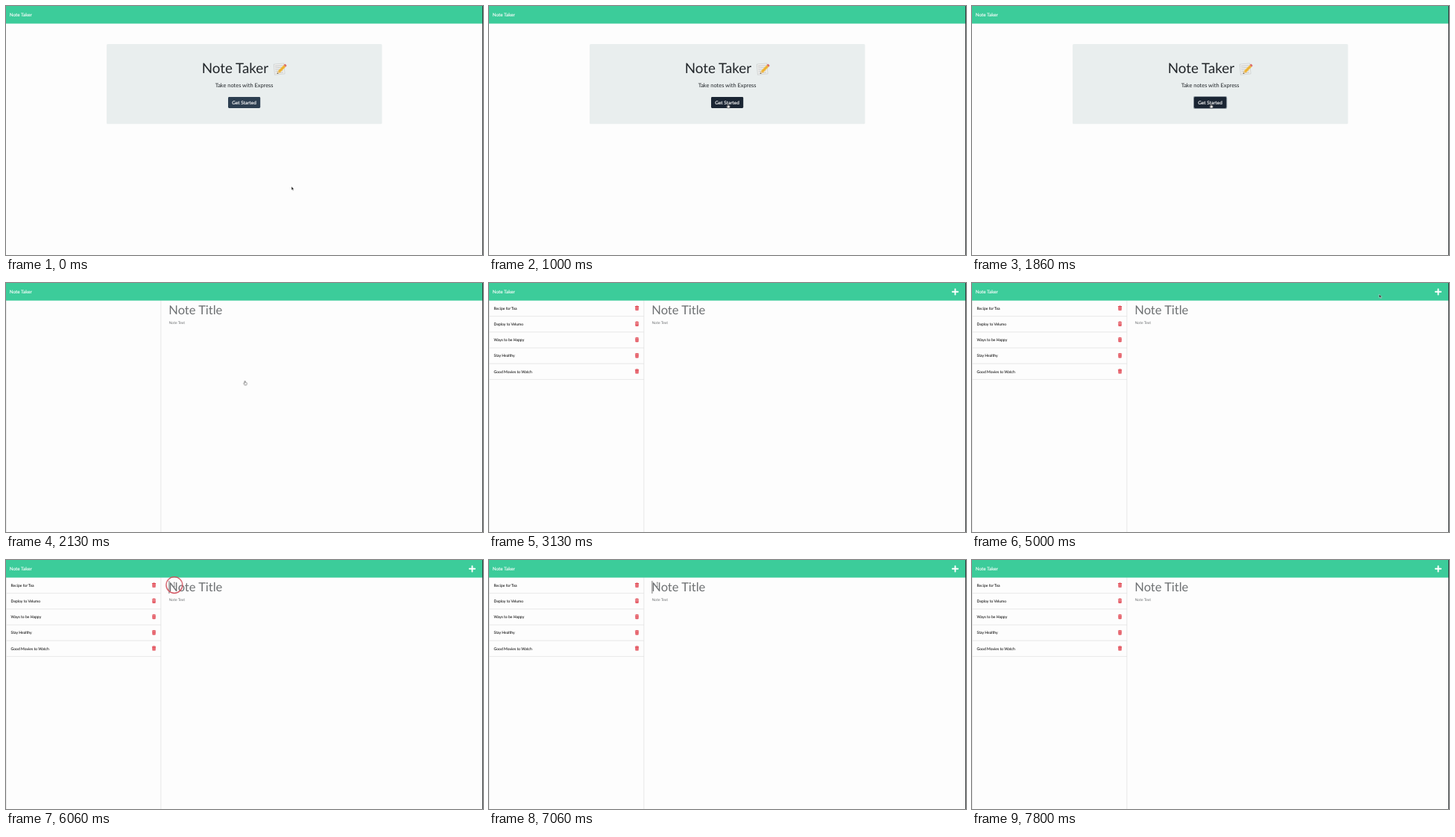
Write an HTML page that moves like this. It is 640x334 px and loops after 8000 ms.

```html
<!DOCTYPE html>
<html lang="en">
<head>
<meta charset="utf-8">
<title>Note Taker</title>
<style>
  html, body { margin: 0; width: 100%; height: 100%; overflow: hidden; background: #fdfdfd; }
  svg { display: block; width: 640px; height: 334px; }
  text { font-family: Lato, "Open Sans", sans-serif; text-rendering: geometricPrecision; fill: #212529; }
  .mid { text-anchor: middle; }
  .white { fill: #fff; stroke: #fff; stroke-width: .12px; }
  .hint { fill: #6e7173; }
  .small { font-size: 5.05px; }
  .item { fill: #111; stroke: #111; stroke-width: .05px; }
  .rule { stroke: #e2e2e2; stroke-width: .8; }

  /* One loop is 8 s: 1% = 80 ms */
  .home, .notes, .list, .arrow, .hand, .beam, .ring, .caret { animation: 8s step-end infinite; }
  .home { animation-name: home; }
  .notes { animation-name: notes; }
  .list { animation-name: list; }
  .arrow { animation-name: arrow; }
  .hand { animation-name: hand; }
  .beam { animation-name: beam; }
  .ring { animation-name: ring; }
  .caret { animation-name: caret; }
  .btn { animation: hover 8s linear infinite; }
  .focus { animation: focus 8s linear infinite; }
  .pointer { animation: travel 8s ease-in-out infinite; }

  @keyframes home { 0% { opacity: 1 } 26.62%, 100% { opacity: 0 } }
  @keyframes notes { 0% { opacity: 0 } 26.62%, 100% { opacity: 1 } }
  @keyframes list { 0% { opacity: 0 } 27.5%, 100% { opacity: 1 } }
  @keyframes hover { 0%, 10% { fill: #2c3e50 } 11.6%, 100% { fill: #1a2533 } }
  @keyframes focus { 0%, 19.9% { opacity: 0 } 22%, 100% { opacity: 1 } }
  @keyframes arrow {
    0% { opacity: 1 } 11.62% { opacity: 0 }
    32.5% { opacity: 1 } 48.5% { opacity: 0 }
    60.4% { opacity: 1 } 71.62%, 100% { opacity: 0 }
  }
  @keyframes hand {
    0% { opacity: 0 } 11.62% { opacity: 1 }
    32.5% { opacity: 0 } 48.5% { opacity: 1 }
    60.4%, 100% { opacity: 0 }
  }
  @keyframes beam { 0% { opacity: 0 } 71.62% { opacity: 1 } 97.45%, 100% { opacity: 0 } }
  @keyframes ring {
    0% { opacity: 0 }
    19.12% { opacity: 1 } 20.87% { opacity: .45 } 21.62% { opacity: 0 }
    55.75% { opacity: 1 } 57.5% { opacity: .45 } 58.25% { opacity: 0 }
    75.7% { opacity: 1 } 77.5% { opacity: .45 } 78.25%, 100% { opacity: 0 }
  }
  @keyframes caret {
    0% { opacity: 0 }
    75.7% { opacity: 1 } 81.62% { opacity: 0 }
    88.25% { opacity: 1 } 94.12%, 100% { opacity: 0 }
  }
  @keyframes travel {
    0%, .75% { transform: translate(383px, 242px) }
    10.75%, 32.5% { transform: translate(320.6px, 131.2px) }
    35.75% { transform: translate(590px, -8px) }
    39.1% { transform: translate(592px, -7px) }
    43.25%, 45% { transform: translate(634px, 20px) }
    50%, 60% { transform: translate(623.2px, 11.3px) }
    68.25%, 71.61% { transform: translate(225px, 30px) }
    71.62%, 100% { transform: translate(225.8px, 33px) }
  }
</style>
</head>
<body>
<svg viewBox="0 0 640 334" xmlns="http://www.w3.org/2000/svg">
  <defs>
    <g id="row">
      <path class="rule" d="M0 21H208"/>
      <g fill="#e0444f">
        <path d="M195.9 7.4h5.2v.9h-5.2zM197.5 6.8h2v.7h-2z"/>
        <path d="M196.2 8.6h4.6l-.25 4.2q0 .4-.5 .4h-3.1q-.5 0-.5-.4z"/>
      </g>
      <path d="M197.3 9.3v3.2M198.5 9.3v3.2M199.7 9.3v3.2" stroke="#f6b8bd" stroke-width=".4"/>
    </g>
  </defs>

  <rect width="640" height="334" fill="#fdfdfd"/>

  <g class="home">
    <rect x="135" y="51" width="369.5" height="107.3" rx="1.6" fill="#e9eeee"/>
    <text x="262.7" y="89.9" font-size="18.8">Note Taker</text>
    <g>
      <path d="M359.3 78.2l13.4-1.3 1.4 14-13.6 1.4z" fill="#f1f1ef" stroke="#b9bcbc" stroke-width=".5"/>
      <path d="M360.8 80.6l10.8-1M361 83l10.6-1M361.3 85.4l10.4-1M361.5 87.8l10.4-1M361.8 90.2l10.2-1" stroke="#a9adb0" stroke-width=".6"/>
      <path d="M363.8 91l1.2-4 7.6-7.8 2.6 2.6-7.6 7.8z" fill="#f3bd3c"/>
      <path d="M366.2 88.4l7.8-7.9" stroke="#d9952a" stroke-width=".7"/>
      <path d="M363.8 91l1.2-4 2.6 2.6z" fill="#e8c99a"/>
      <path d="M363.8 91l.5-1.6 1 1z" fill="#333"/>
      <path d="M372.6 79.2l1.2-1.2q.6-.5 1.2 0l1.3 1.4q.5.6 0 1.1l-1.1 1.3z" fill="#dd6f68"/>
    </g>
    <text class="mid" x="319.6" y="109.2" font-size="7.45">Take notes with Express</text>
    <rect class="focus" x="297" y="121" width="45.2" height="17" rx="2" fill="#8b959e"/>
    <rect class="btn" x="298" y="122" width="43.2" height="15" rx="1.4"/>
    <text class="mid white" x="319.6" y="131.8" font-size="6.45" font-weight="500">Get Started</text>
  </g>

  <g class="notes">
    <path class="rule" d="M.4 23V334M207.8 23V334"/>
    <text class="hint" x="218.3" y="42.4" font-size="16.5">Note Title</text>
    <text class="hint small" x="218.6" y="55.4">Note Text</text>
    <rect class="caret" x="218.5" y="28" width=".8" height="17" fill="#555"/>
  </g>

  <rect width="640" height="23.6" fill="#3ccc9a"/>
  <text class="white" x="4.8" y="14" font-size="6.3">Note Taker</text>

  <g class="list">
    <g id="rows"></g>
    <path d="M621.8 11.8h7.4M625.5 8.1v7.4" stroke="#fff" stroke-width="1.9" stroke-linecap="round"/>
  </g>

  <rect x="639.1" width=".9" height="334" fill="#2b2f30"/>

  <g class="pointer">
    <path class="arrow" d="M0 0V5L1.2 4L2 5.8L2.9 5.4L2.1 3.7H3.6Z" fill="#222" stroke="#fff" stroke-width=".45"/>
    <path class="hand" d="M-.6 .5Q0-.3 .5 .5V2.1Q2.6 2.1 2.7 3.2Q2.7 4.6 1.9 5.7H-.5Q-1.3 4.6-1.9 3.4Q-1.5 2.6-.6 3.4Z" fill="#fff" stroke="#222" stroke-width=".5"/>
    <path class="beam" d="M-1-3Q0-3 0-2.4Q0-3 1-3M0-2.4V2.4M-1 3Q0 3 0 2.4Q0 3 1 3" fill="none" stroke="#444" stroke-width=".6"/>
    <circle class="ring" cy=".6" r="10.9" fill="none" stroke="#d0505c" stroke-width="1.3"/>
  </g>
</svg>
<script>
  const titles = ["Recipe for Tea", "Deploy to Velumo", "Ways to be Happy", "Stay Healthy", "Good Movies to Watch"];
  document.getElementById("rows").innerHTML = titles.map((title, i) =>
    `<g transform="translate(0 ${23.6 + i * 21.2})">
      <use href="#row"/>
      <text class="small item" x="6.6" y="12.2">${title}</text>
    </g>`).join("");
</script>
</body>
</html>
```
